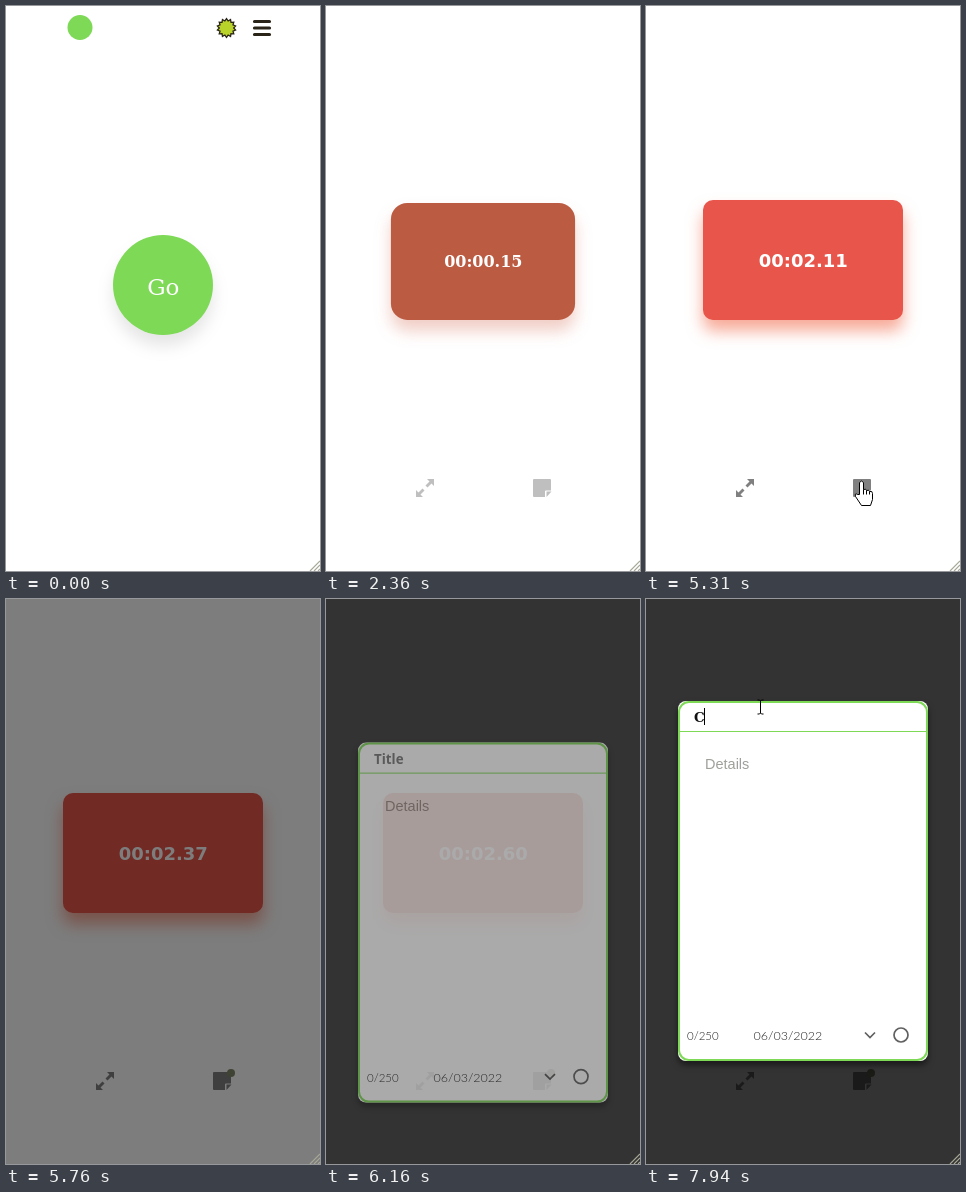
These frames come from a looping animation (314x565 px, 8000 ms). An HTML page:

```html
<!DOCTYPE html>
<html lang="en">
<head>
<meta charset="utf-8">
<title>Timer and note</title>
<style>
  html, body { margin: 0; height: 100%; overflow: hidden; background: #fff; }
  svg { display: block; width: 314px; height: 565px; }
  .lato { font-family: Lato, sans-serif; font-weight: 300; fill: #222; }
  #sheet { filter: drop-shadow(0 4px 3px rgba(0, 0, 0, .5)); }
  .cursor { fill: #fff; stroke: #000; stroke-linejoin: round; }
</style>
</head>
<body>
<svg viewBox="0 0 314 565">
  <g id="header">
    <circle cx="74" cy="21.5" r="12.5" fill="#7ed957"/>
    <polygon id="sun" fill="#b9d32b" stroke="#2a2418" stroke-width="1.3"/>
    <path d="M248.5 15.5h15M248.5 22h15M248.5 28.5h15" stroke="#2a2418" stroke-width="3.2" stroke-linecap="round"/>
  </g>
  <g id="tools" fill="#808080">
    <path d="M108 473v7l-2.5-2.5-4 4-2-2 4-4-2.5-2.5zM90 491v-7l2.5 2.5 4-4 2 2-4 4 2.5 2.5z"/>
    <path d="M208 473h16q1 0 1 1v10.5h-5q-1 0-1 1v5.5h-11q-1 0-1-1v-16q0-1 1-1zM220.5 491v-5.5h5z"/>
    <circle id="badge" cx="225" cy="474" r="4" fill="#808a68"/>
  </g>
  <rect id="card"/>
  <text id="label" x="157.3" fill="#fff" text-anchor="middle"></text>
  <rect id="shade" width="314" height="565"/>
  <g id="modal">
    <rect id="sheet" x="32" y="102" width="250" height="360" rx="8" fill="#fff"/>
    <rect x="33" y="103" width="248" height="358" rx="10" fill="none" stroke="#7ed957" stroke-width="2"/>
    <path d="M33 132.5h248" stroke="#7ed957"/>
    <text id="title" x="48" y="123"></text>
    <path id="caret" stroke="#000"/>
    <text x="59" y="170" font-size="14.5" font-family="Liberation Sans, sans-serif" fill="#a0a09a">Details</text>
    <text x="41" y="441" font-size="11.5" class="lato">0/250</text>
    <text x="107.5" y="441" font-size="12.5" class="lato">06/03/2022</text>
    <g fill="none" stroke="#606060" stroke-width="1.7">
      <path d="M219 433.5l5 5 5-5"/>
      <circle cx="255" cy="436" r="7"/>
    </g>
  </g>
  <path d="M304 565l10-10M308 565l6-6M312 565l2-2" stroke="#a8a898" stroke-width="1.2"/>
  <path id="arrow" class="cursor" d="M0 0V17l4-4 3 7 2.5-1-3-6.5H12z"/>
  <path id="hand" class="cursor" d="M-2 13V1q2-3 4 0v7q3-1 3 1q3-1 3 1q3-1 3 2v6l-2 6h-9l-6-9q-1-4 2-2zM2 8v5M5 9v4M8 10v3"/>
  <path id="beam" class="cursor" style="fill:none" d="M-3-7h2l1 1 1-1h2M0-6V6M-3 7h2l1-1 1 1h2"/>
</svg>
<script>
const LOOP = 8000, MORPH = 2060, CLOCK = 2130, NOTE = 5390, TYPE = 7940;
const $ = id => document.getElementById(id);
const set = (id, attrs) => {
  for (const name in attrs) $(id).setAttribute(name, attrs[name]);
};
const show = (id, opacity) => set(id, { opacity });
const mix = (a, b, p) => a + (b - a) * p;

// Progress 0..1 from start over ms; a power above 1 eases out.
const ease = (t, start, ms, power = 1) =>
  1 - (1 - Math.min(1, Math.max(0, (t - start) / ms))) ** power;

const clockKeys = [[CLOCK, 0], [2360, .15], [3400, .85], [5310, 2.11], [6160, 2.6]];

const moves = [
  { start: 290, ms: 900, hide: 2120, from: [300, 552], to: [153, 304], power: [1.5, 1.5] },
  { start: 2840, ms: 800, hide: 5480, from: [282, 300], to: [215.5, 475.5], power: [3, 1.4] },
  { start: 6500, ms: 200, hide: 6910, from: [190, 230], to: [127, 114], power: [1, 1] },
  { start: 6910, ms: 160, hide: LOOP, from: [127, 114], to: [114.5, 108], power: [1, 2] }
];

function seconds(t) {
  const next = Math.max(1, clockKeys.findIndex(k => k[0] > t));
  const i = t >= clockKeys.at(-1)[0] ? clockKeys.length - 1 : next;
  const [t0, a] = clockKeys[i - 1], [t1, b] = clockKeys[i];
  return mix(a, b, (t - t0) / (t1 - t0));
}

function drawCard(t) {
  const p = ease(t, MORPH, 500, 2);
  const width = mix(100, 200, p), height = mix(100, 120, p);
  const middle = mix(279, 254, ease(t, MORPH, 320));
  const dim = 1 - .27 * Math.sin(Math.PI * p);
  const fill = `rgb(${mix(126, 232, p) * dim},${mix(217, 85, p) * dim},${mix(87, 74, p) * dim})`;
  set('card', { x: 157 - width / 2, y: middle - height / 2, width, height, rx: mix(50, 10, p), fill });
  const alpha = mix(.1, .5, ease(t, MORPH, 730));
  $('card').style.filter = `drop-shadow(0 11px 8px rgba(${240 * p},${85 * p},${50 * p},${alpha}))`;

  const running = t >= CLOCK, settled = t >= MORPH + 450;
  const label = $('label');
  label.textContent = running ? '00:' + seconds(t).toFixed(2).padStart(5, '0') : 'Go';
  label.style.font = settled ? 'bold 18px "DejaVu Sans", sans-serif'
    : `${running ? 'bold 16px' : '23px'} "DejaVu Serif", serif`;
  set('label', { y: middle + (settled ? 7 : running ? 6 : 9.5) });
}

function drawModal(t) {
  const p = ease(t, NOTE + 590, 510, 2);
  set('modal', { opacity: p, transform: `translate(0 ${100 * (1 - p)})` });
  const typed = t >= TYPE, title = $('title');
  title.textContent = typed ? 'C' : 'Title';
  title.style.font = `bold 13.333px ${typed ? '"DejaVu Serif", serif' : '"Noto Sans", sans-serif'}`;
  set('title', { fill: typed ? '#111' : '#757575' });
  set('caret', { d: `M${typed ? 58.5 : 48.5} 109v17` });
  show('caret', typed || (t >= 7240 && t < 7780) ? 1 : 0);
}

function drawCursor(t) {
  const move = moves.find(m => t >= m.start && t < m.hide);
  let shape = '';
  if (move) {
    const [x, y] = move.from.map((a, i) => mix(a, move.to[i], ease(t, move.start, move.ms, move.power[i])));
    const overButton = t < CLOCK && Math.hypot(x - 157, y - 279) < 50;
    const overNote = t < 5480 && y >= 473 && x > 205 && x < 227;
    shape = overButton || (t > CLOCK && overNote) ? 'hand' : t > NOTE && y < 132 ? 'beam' : 'arrow';
    set(shape, { transform: `translate(${x} ${y})` });
  }
  for (const id of ['arrow', 'hand', 'beam']) show(id, id === shape ? 1 : 0);
}

function frame() {
  const t = performance.now() % LOOP;
  show('header', 1 - ease(t, 2030, 310));
  show('tools', ease(t, 2160, 400));
  show('badge', t >= NOTE + 90 ? 1 : 0);
  show('shade', .8 * ease(t, NOTE, 580));
  drawCard(t);
  drawModal(t);
  drawCursor(t);
  requestAnimationFrame(frame);
}

const spikes = 14;
set('sun', {
  points: Array.from({ length: spikes * 2 }, (_, i) => {
    const r = i % 2 ? 7.2 : 9.3, a = i * Math.PI / spikes;
    return [220.5 + r * Math.sin(a), 22 - r * Math.cos(a)];
  }).join(' ')
});
frame();
</script>
</body>
</html>
```
